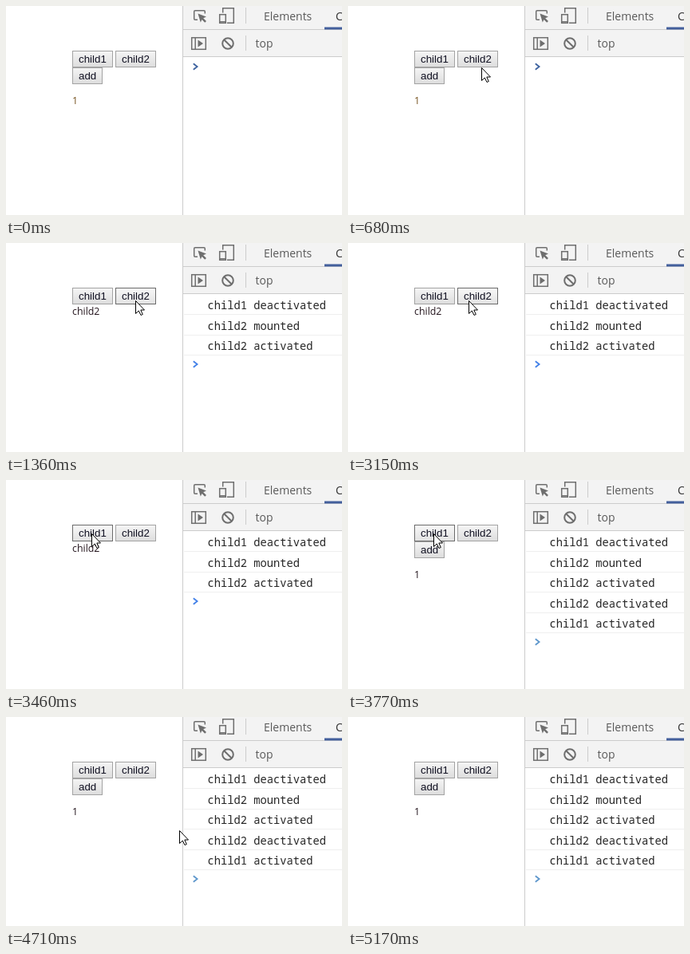
These frames come from a looping animation (421 by 262 pixels, 6.03 s). An HTML page:

```html
<!DOCTYPE html>
<html lang="en">
<head>
<meta charset="utf-8">
<style>
html, body { margin: 0; width: 100%; height: 100%; overflow: hidden; background: #fff; }
svg { display: block; width: 421px; height: 262px; }
.ui { font: 14px "Open Sans", sans-serif; fill: #5a5a5a; }
.log { font: 13.75px "Noto Sans Mono", monospace; fill: #262626; white-space: pre; }
.button text { font: 13.333px "Liberation Sans", Arial, sans-serif; fill: #111122; }
.button rect { fill: url(#face); stroke: #a3a3a3; }
.button.hover rect { fill: url(#lit); stroke: #6b6b6b; }
.label { font: 12.4px "Open Sans", sans-serif; fill: #24151d; }
.icon { fill: none; stroke: #6e6e6e; stroke-width: 1.5; }
.solid { fill: #6e6e6e; stroke: none; }
.rule { stroke: #ccc; }
</style>
</head>
<body>
<svg viewBox="0 0 421 262">
  <defs>
    <linearGradient id="face" x2="0" y2="1">
      <stop stop-color="#f5f5f5"/><stop offset="1" stop-color="#dddddd"/>
    </linearGradient>
    <linearGradient id="lit" x2="0" y2="1">
      <stop stop-color="#f8f8f8"/><stop offset="1" stop-color="#e2e2e2"/>
    </linearGradient>
  </defs>

  <!-- page -->
  <g id="buttons"></g>
  <text id="label" class="label" x="83"></text>

  <!-- developer tools -->
  <rect x="222" width="199" height="63" fill="#f3f3f3"/>
  <path class="rule" d="M221.5 0V262M222 29.5H421M222 63.5H421M300.5 2V22M300.5 37V56"/>
  <path d="M399 28H421" stroke="#435f9c" stroke-width="3"/>
  <g class="icon">
    <path d="M240 17.2H237Q235.7 17.2 235.7 16V7Q235.7 5.7 237 5.7H248Q249.3 5.7 249.3 7V9.5"/>
    <path class="solid" d="M240.5 9.5L251 13.5L247.2 15.2L251 19L249.2 20.8L245.5 17L243.8 20.5Z"/>
    <path d="M271.7 8.5V2.7H285.3V21.3H277"/>
    <rect x="267.7" y="10.7" width="7.6" height="10.6"/>
    <path d="M267.5 19.8H275.5"/>
    <rect x="232.7" y="39.7" width="17.6" height="14.6"/>
    <path d="M237.2 40V54"/>
    <path class="solid" d="M240.5 42.5V51.5L247 47Z"/>
    <circle cx="278" cy="47" r="6.8" stroke-width="2"/>
    <path d="M273.2 42.2L282.8 51.8" stroke-width="2"/>
  </g>
  <text class="ui" x="323" y="18">Elements</text>
  <text class="ui" x="413" y="18" style="fill:#333">Console</text>
  <text class="ui" x="312.5" y="52">top</text>
  <g id="logs"></g>
  <path id="prompt" d="M234.8 72.2L239.6 76L234.8 79.8" fill="none" stroke-width="1.8"/>

  <!-- pointer -->
  <g id="pointer">
    <g id="ring" fill="none">
      <circle r="11" stroke="#000"/>
      <circle r="10" stroke="#fff"/>
    </g>
    <path d="M.5 .5V16.5L4.3 13L7 18.5L9.3 17.5L6.8 12H11.5Z" fill="#fff" stroke="#000"/>
  </g>
</svg>
<script>
const LOOP = 6030, ROW = 25.5;
const $ = id => document.getElementById(id);
const messages = ["child1 deactivated", "child2 mounted", "child2 activated",
  "child2 deactivated", "child1 activated"];
const buttons = [
  { name: "child1", x: 83, y: 56, w: 51 },
  { name: "child2", x: 137, y: 56, w: 51 },
  { name: "add", x: 83, y: 77, w: 38 }
];

// Sampled pointer positions: time, x, y; each holds until the next.
const path = [
  [210, 195, 147],
  [430, 192, 138], [500, 185, 119], [560, 177, 99], [620, 171, 84],
  [680, 167, 77], [760, 164, 74], [830, 163, 73], [900, 162, 72],
  [3150, 151, 72], [3230, 136, 71], [3310, 121, 69], [3390, 111, 68], [3460, 107, 67],
  [4470, 116, 73], [4550, 145, 92], [4630, 180, 116], [4710, 217, 142],
  [4790, 255, 171], [4870, 294, 201], [4940, 327, 226], [5020, 349, 243],
  [5090, 352, 246]
];
const LEAVE = 5170;

$("buttons").innerHTML = buttons.map(b => `<g class="button">
  <rect x="${b.x + .5}" y="${b.y + .5}" width="${b.w - 1}" height="20"/>
  <text x="${b.x + 8}" y="${b.y + 15}">${b.name}</text></g>`).join("");
$("logs").innerHTML = messages.map((m, i) => `<g>
  <path d="M223 ${Math.floor(89.5 + ROW * i) + .5}H421" stroke="#efefef"/>
  <text class="log" x="252.5" y="${Math.round(83 + ROW * i)}">${m}</text></g>`).join("");
const buttonNodes = [...$("buttons").children];
const logNodes = [...$("logs").children];

const show = (node, on) => node.style.display = on ? "" : "none";
const between = (t, from, to) => t >= from && t < to;

function draw(t) {
  const second = between(t, 1360, 3770);
  const count = t < 1360 ? 0 : second ? 3 : 5;
  const at = t < LEAVE && path.findLast(p => p[0] <= t);

  $("label").textContent = second ? "child2" : "1";
  $("label").setAttribute("y", second ? 90 : 123);
  $("label").style.fill = count ? "" : "#76531f";
  logNodes.forEach((node, i) => show(node, i < count));
  $("prompt").setAttribute("transform", `translate(0 ${Math.floor(ROW * count)})`);
  $("prompt").setAttribute("stroke", { 0: "#3c629f", 3: "#4280e8", 5: "#5e97cc" }[count]);

  buttonNodes.forEach((node, i) => {
    const b = buttons[i];
    const over = at && between(at[1], b.x, b.x + b.w) && between(at[2], b.y, b.y + 21);
    node.classList.toggle("hover", !!over);
  });
  show(buttonNodes[2], !second);

  show($("pointer"), at);
  if (at) $("pointer").setAttribute("transform", `translate(${at[1]} ${at[2]})`);
  show($("ring"), between(t, 1210, 1360) || between(t, 3690, 3770));
}

const start = performance.now();
function tick() {
  draw((performance.now() - start) % LOOP);
  requestAnimationFrame(tick);
}
tick();
</script>
</body>
</html>
```
